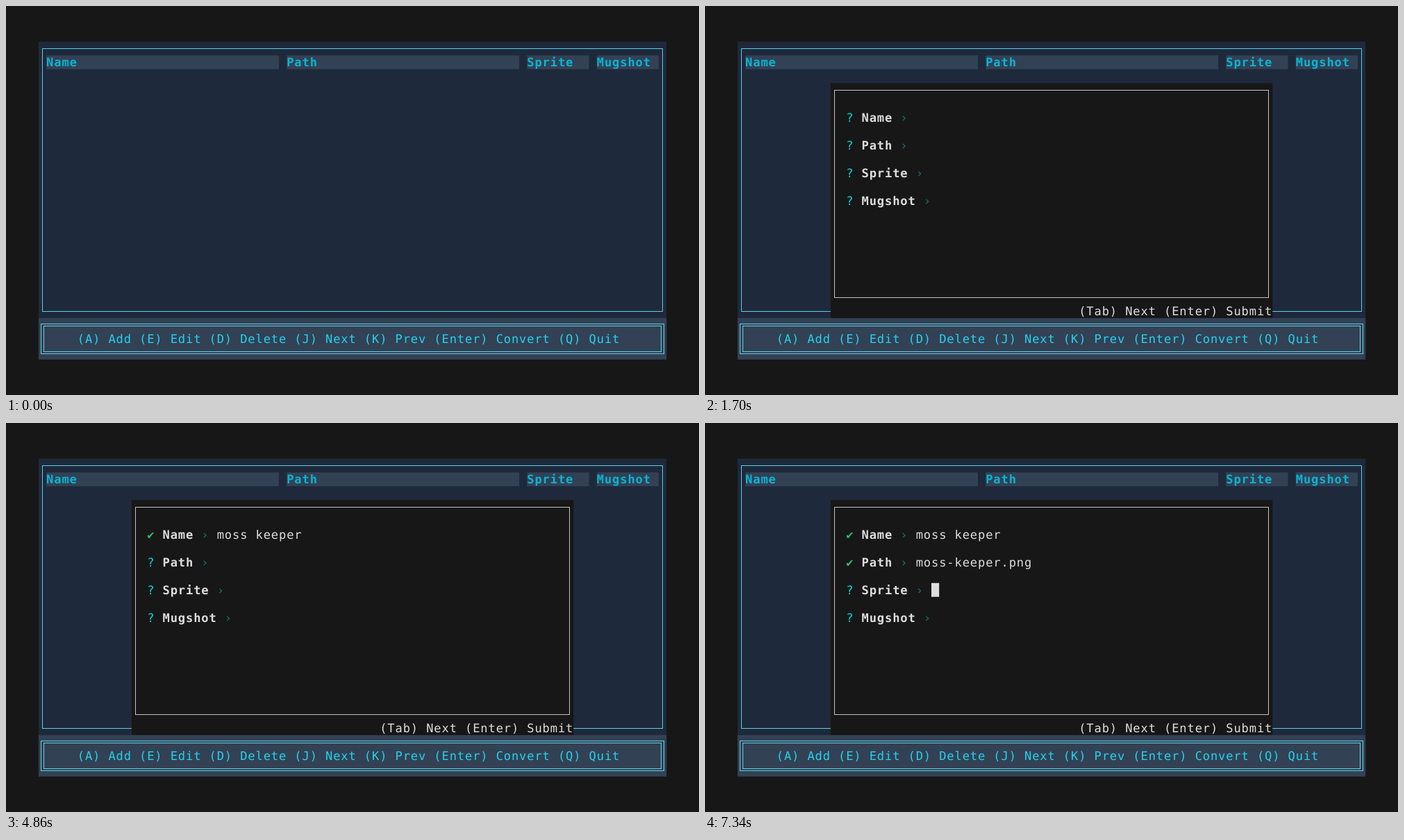
Recreate the animation shown at these times as an HTML page. Size 998 by 561 pixels, loop 8 s.

```html
<!DOCTYPE html>
<html lang="en">
<head>
<meta charset="utf-8">
<title>Terminal form</title>
<style>
  html, body { margin: 0; width: 100%; height: 100%; overflow: hidden; background: #171717; }
  svg { display: block; width: 998px; height: 561px; }
  text {
    font-family: "DejaVu Sans Mono", monospace;
    font-size: 17.15px;
    letter-spacing: calc(11.165px - 1ch);
    text-rendering: geometricPrecision;
    white-space: pre;
  }
  .bold { font-weight: bold; }
</style>
</head>
<body>
<svg id="stage" viewBox="0 0 998 561" xmlns="http://www.w3.org/2000/svg"></svg>
<script>
const LOOP = 8000;
const CELL = { x: 46.9, y: 51.35, w: 11.165, h: 19.935 };
const BASELINE = 15.9;
const C = {
  back: '#171717', panel: '#1e293b', bar: '#334155',
  head: '#06b6d4', keys: '#22d3ee', frame: '#67e8f9',
  text: '#dddddd', cyan: '#04d7d7', green: '#31bb71', red: '#d74e6f'
};

const stage = document.getElementById('stage');
const colX = c => CELL.x + c * CELL.w;
const rowY = r => CELL.y + r * CELL.h;
const snap = v => Math.floor(v) + 0.5;

function add(parent, tag, attrs, content = '') {
  const node = document.createElementNS('http://www.w3.org/2000/svg', tag);
  for (const key in attrs) node.setAttribute(key, attrs[key]);
  node.textContent = content;
  return parent.appendChild(node);
}

// Positions and sizes are in terminal cells.
function fill(parent, col, row, cols, rows, color) {
  return add(parent, 'rect', {
    x: colX(col), y: rowY(row), width: cols * CELL.w, height: rows * CELL.h, fill: color
  });
}

function print(parent, col, row, content, color, cls = '') {
  return add(parent, 'text', {
    x: colX(col), y: rowY(row) + BASELINE, fill: color, class: cls
  }, content);
}

function outline(parent, x1, y1, x2, y2, color) {
  add(parent, 'rect', {
    x: x1, y: y1, width: x2 - x1, height: y2 - y1,
    fill: 'none', stroke: color, 'stroke-width': 1, 'stroke-opacity': 0.87
  });
}

// Border running through the centres of the corner cells.
function cellBorder(parent, c1, r1, c2, r2, color) {
  outline(parent, snap(colX(c1 + 0.5)), snap(rowY(r1 + 0.5)),
    snap(colX(c2 + 0.5)), snap(rowY(r2 + 0.5)), color);
}

// Table screen
fill(stage, 0, 0, 81, 20, C.panel);
cellBorder(stage, 0, 0, 80, 19, C.frame);
[['Name', 1, 30], ['Path', 32, 30], ['Sprite', 63, 8], ['Mugshot', 72, 8]].forEach(([title, col, cols]) => {
  fill(stage, col, 1, cols, 1, C.bar);
  print(stage, col, 1, title, C.head, 'bold');
});

// Key bar
fill(stage, 0, 20, 81, 3, C.bar);
outline(stage, 50.5, 458.5, 947.5, 501.5, C.frame);
outline(stage, 54.5, 461.5, 943.5, 498.5, C.frame);
print(stage, 5, 21, '(A) Add (E) Edit (D) Delete (J) Next (K) Prev (Enter) Convert (Q) Quit', C.keys);

// The dialog first appears with only its upper rows painted.
const clip = add(stage, 'clipPath', { id: 'upper' });
fill(clip, 12, 3, 57, 9, C.back);
fill(clip, 12, 12, 33, 1, C.back);

const dialog = add(stage, 'g', {});
fill(dialog, 12, 3, 57, 17, C.back);
cellBorder(dialog, 12, 3, 68, 18, C.text);
print(dialog, 44, 19, '(Tab) Next (Enter) Submit', C.text);

const fields = ['Name', 'Path', 'Sprite', 'Mugshot'].map((label, i) => {
  const row = 5 + 2 * i;
  const arrow = 17 + label.length;
  const mark = print(dialog, 14, row, '?', C.cyan);
  print(dialog, 16, row, label, C.text, 'bold');
  print(dialog, arrow, row, '›', C.cyan).setAttribute('opacity', 0.5);
  return { row, mark, col: arrow + 2, value: print(dialog, arrow + 2, row, '', C.text) };
});
const error = print(dialog, 14, 8, 'Must be a png file!', C.red);
const cursor = fill(dialog, 23, 5, 1, 1, C.text);

// Key press times for each typed field
const typing = [
  { text: 'moss keeper',
    keys: [2500, 2660, 2700, 2860, 2940, 3020, 3180, 3300, 3380, 3500, 3580] },
  { text: 'moss-keeper.png',
    keys: [5660, 5740, 5860, 6020, 6100, 6220, 6340, 6420, 6580, 6660, 6740, 6900, 7020, 7100, 7220] }
];

// [from, to, field] while the cursor is lit
const lit = [
  [540, 1700, 0], [2500, 3660, 0],
  [3660, 4860, 1], [5660, 7300, 1],
  [7340, LOOP, 2]
];

const show = (node, on) => node.setAttribute('visibility', on ? 'visible' : 'hidden');

function setMark(field, glyph, color) {
  field.mark.textContent = glyph;
  field.mark.setAttribute('fill', color);
}

function render(t) {
  dialog.setAttribute('display', t < 500 ? 'none' : 'inline');
  dialog.setAttribute('clip-path', t < 540 ? 'url(#upper)' : 'none');

  const counts = typing.map(({ text, keys }, i) => {
    const count = keys.filter(k => k <= t).length;
    fields[i].value.textContent = text.slice(0, count);
    return count;
  });

  const invalid = counts[1] > 0 && counts[1] < typing[1].text.length;
  show(error, invalid);
  fields.slice(0, 2).forEach((field, i) => {
    if (!counts[i]) setMark(field, '?', C.cyan);
    else if (i === 1 && invalid) setMark(field, '✘', C.red);
    else setMark(field, '✔', C.green);
  });

  const spot = lit.find(([from, to]) => t >= from && t < to);
  show(cursor, Boolean(spot));
  if (spot) {
    const field = fields[spot[2]];
    cursor.setAttribute('x', colX(field.col + (counts[spot[2]] || 0)));
    cursor.setAttribute('y', rowY(field.row));
  }
}

const start = performance.now();
function tick() {
  render((performance.now() - start) % LOOP);
  requestAnimationFrame(tick);
}
tick();
</script>
</body>
</html>
```
